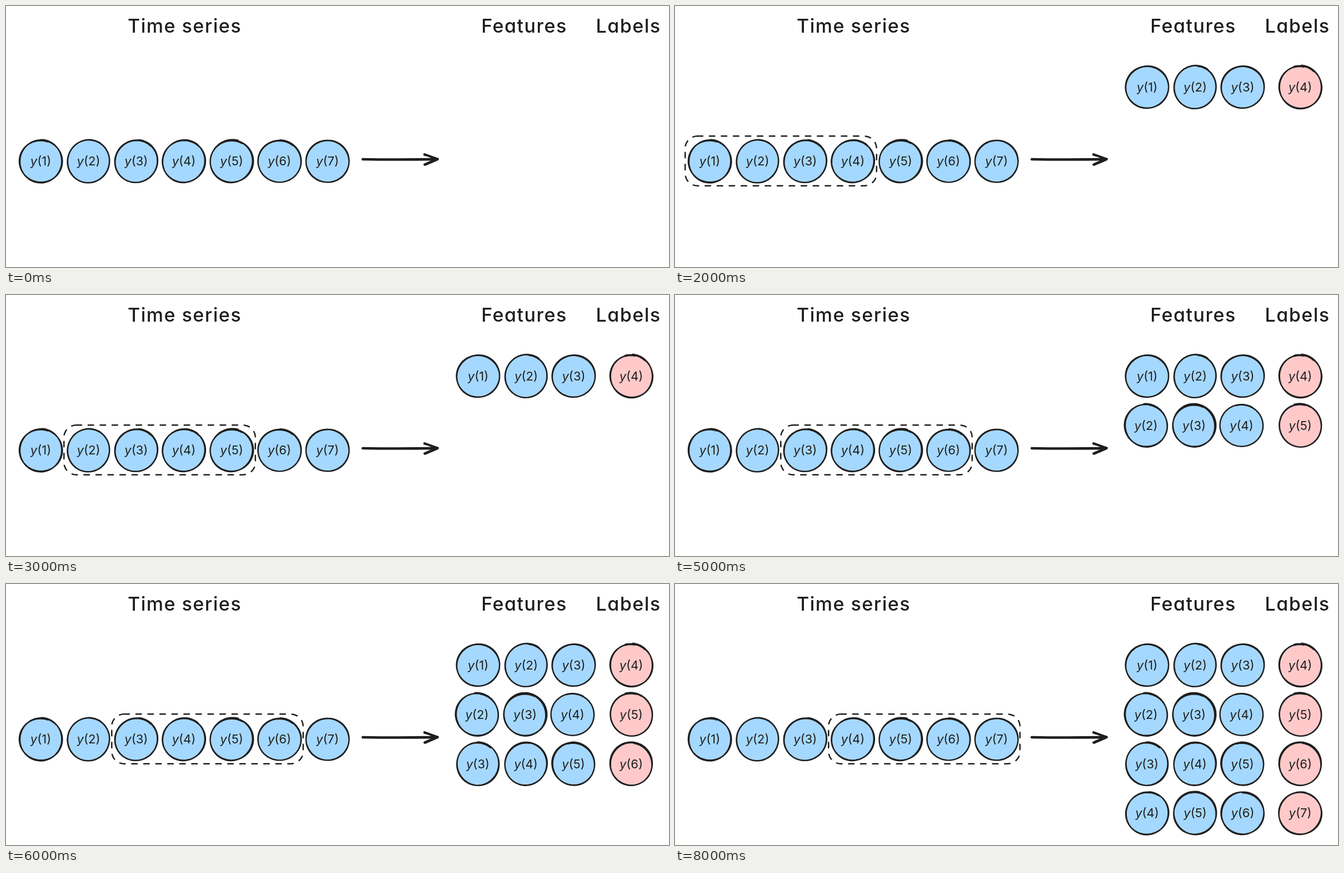
An HTML page that plays this animation: 1193 px wide and 470 px high, repeating every 10 s.

```html
<!DOCTYPE html>
<html lang="en">
<head>
<meta charset="utf-8">
<title>Sliding window over a time series</title>
<style>
  html, body { margin: 0; width: 100%; height: 100%; overflow: hidden; background: #fff; }
  svg { display: block; width: 100%; height: 100%; }
  text { font-family: Inter, Lato, sans-serif; font-feature-settings: "cv11"; fill: #1e1e1e; text-anchor: middle; }
  .title { font-size: 34px; font-weight: 500; letter-spacing: 1.5px; }
  .label { font-size: 22px; }
  .label tspan { font-style: italic; }
  path, rect { fill: none; stroke: #1e1e1e; stroke-linecap: round; stroke-linejoin: round; }
</style>
</head>
<body>
<svg viewBox="0 0 1193 470">
  <text class="title" x="321.5" y="48">Time series</text>
  <text class="title" x="932.5" y="48">Features</text>
  <text class="title" x="1120" y="48">Labels</text>
  <g id="series"></g>
  <rect id="window" x="18.3" y="234.3" width="344.4" height="89.4" rx="22"
        stroke-width="2.5" stroke-dasharray="9.6 12"/>
  <path stroke-width="4.6" d="M642 276Q700 277 776 276"/>
  <path stroke-width="3.8" d="M753 267Q764 271 777 275.6Q764 280 753 285.5M753 268Q765 271 776 276.4Q766 281 754 286"/>
  <g id="rows"></g>
</svg>
<script>
const BLUE = '#a5d8ff', PINK = '#ffc9c9';
const LOOP = 10000, STEP = 2000, PITCH = 86, RADIUS = 38.2;
const SERIES_X = [62.5, 148.5, 234.3, 320, 406, 492, 578.5];
const COLUMN_X = [849.5, 936, 1021.5, 1125];
const ROW_SHIFT = [0, -2, -0.5, 0];

let seed = 7;
const random = () => (seed = seed * 16807 % 2147483647) / 2147483647;

function add(parent, name, attributes) {
  const node = document.createElementNS('http://www.w3.org/2000/svg', name);
  for (const key in attributes) node.setAttribute(key, attributes[key]);
  return parent.appendChild(node);
}

// One pen loop that overlaps itself near the top, where its ends miss each other slightly.
function penLoop(x, y) {
  const start = -1.9 + random() * 0.5;
  const sweep = Math.PI * 2 + 0.3 + random() * 0.4;
  const drift = (random() - 0.5) * 4;
  const phase = random() * 6;
  const points = [];
  for (let i = 0; i <= 60; i++) {
    const angle = start + sweep * i / 60;
    const radius = RADIUS + 0.6 * Math.sin(2 * angle + phase) + drift * (i / 60 - 0.5);
    points.push((x + radius * Math.cos(angle)).toFixed(1) + ' ' + (y + radius * Math.sin(angle)).toFixed(1));
  }
  return 'M' + points.join('L');
}

function drawNode(parent, x, y, index, color) {
  add(parent, 'circle', { cx: x, cy: y, r: RADIUS, fill: color });
  add(parent, 'path', { d: penLoop(x, y) + penLoop(x, y), 'stroke-width': 2.4 });
  const label = add(parent, 'text', { class: 'label', x, y: y + 7.5 });
  add(label, 'tspan', {}).textContent = 'y';
  label.append(`(${index})`);
}

const series = document.getElementById('series');
SERIES_X.forEach((x, i) => drawNode(series, x, 279.7, i + 1, BLUE));

const rows = ROW_SHIFT.map((shift, row) => {
  const group = add(document.getElementById('rows'), 'g', {});
  COLUMN_X.forEach((x, column) => {
    const isTarget = column === 3;
    drawNode(group, isTarget ? x : x + shift, 146.2 + 88.9 * row, row + column + 1, isTarget ? PINK : BLUE);
  });
  return group;
});

const frame = document.getElementById('window');
const show = (node, visible) => node.setAttribute('visibility', visible ? 'visible' : 'hidden');

function render() {
  const time = performance.now() % LOOP;
  const position = Math.min(3, Math.floor((time - 1000) / STEP));
  show(frame, position >= 0);
  frame.setAttribute('transform', `translate(${Math.max(0, position) * PITCH} 0)`);
  rows.forEach((group, row) => show(group, time >= STEP * (row + 1)));
  requestAnimationFrame(render);
}
render();
</script>
</body>
</html>
```
